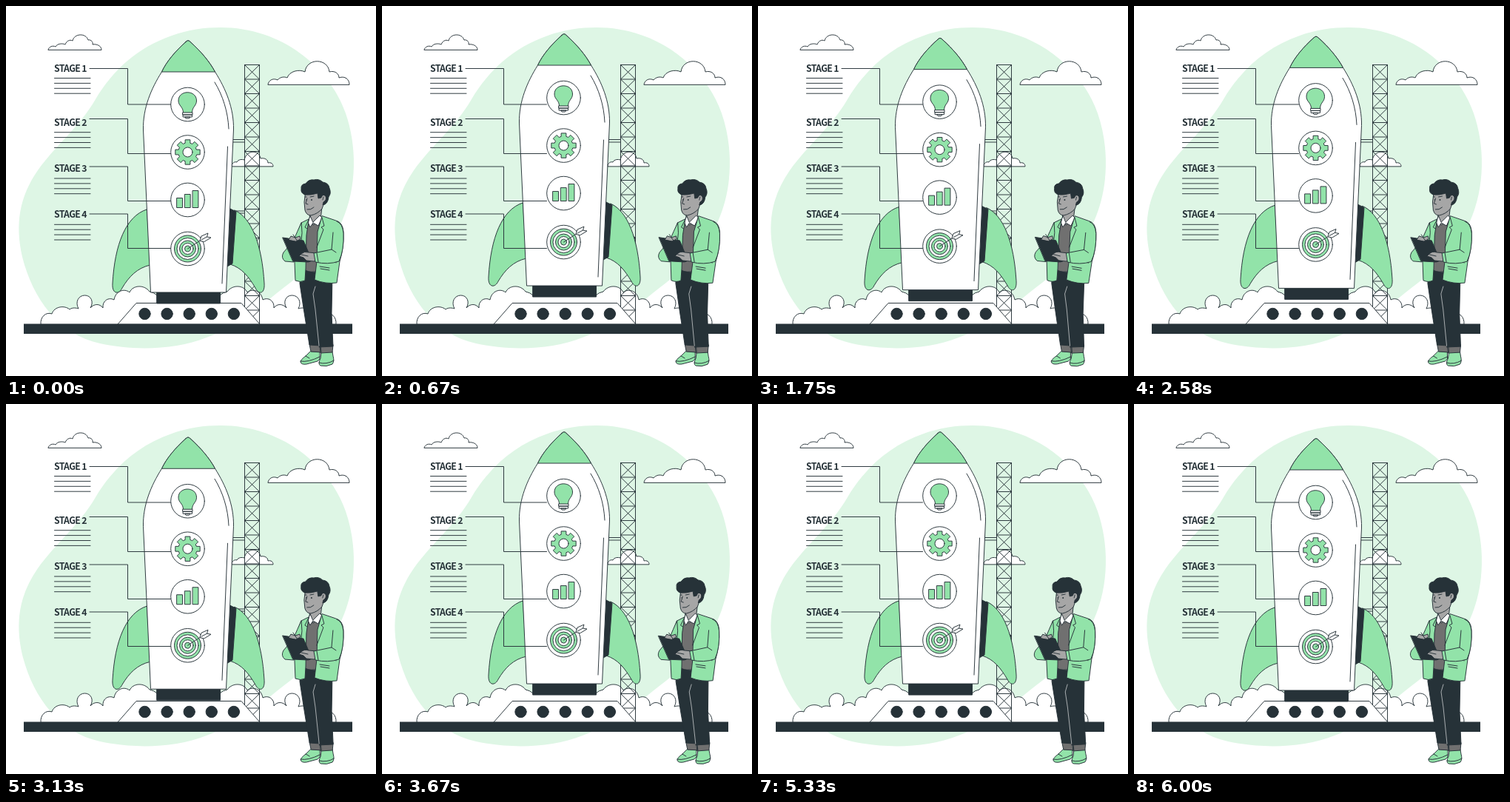
Write an HTML page that moves like this. It is 500 px wide and 500 px high and loops after 6040 ms.

```html
<!DOCTYPE html>
<html lang="en">
<head>
<meta charset="utf-8">
<title>Rocket stages</title>
<style>
  html, body { margin: 0; width: 100%; height: 100%; overflow: hidden; background: #fff; }
  svg { display: block; width: 100vw; height: 100vh; }
  .line { fill: none; }
  .white { fill: #fff; }
  .green { fill: #92e3a9; }
  .dark { fill: #263238; }
  .skin { fill: #a6a6a6; }
  .knit { fill: #707070; }
  .flat { stroke: none; }
  text { font: 700 12.3px "Noto Sans CJK JP", "Noto Sans CJK SC", "Open Sans", sans-serif; letter-spacing: -.7px; fill: #263238; stroke: none; }
</style>
</head>
<body>
<svg viewBox="0 0 500 500" stroke="#263238" stroke-width=".95" stroke-linejoin="round" stroke-linecap="round">
  <path class="flat" fill="#def6e5" d="M290 29C372 29 437 82 459 145C474 188 475 244 454 291C436 335 402 360 371 384C335 413 310 434 271 448C228 465 173 466 127 456C71 444 36 395 22 339C12 295 18 258 43 222C68 187 99 164 121 126C145 86 178 56 224 40C246 32 268 29 290 29Z"/>

  <g class="white">
    <path d="M57 59C58 55 63 53 67 55C69 51 76 50 80 52C82 47 86 45 90 47C92 37 108 36 111 46C115 45 118 49 117 52C123 51 129 54 129 59Z"/>
    <path d="M354 106C355 100 361 97 367 100C370 96 376 95 380 97C383 88 396 85 404 89C406 70 435 70 437 89C444 87 450 91 450 97C458 94 464 99 464 106Z"/>
    <path d="M305 216.500C305 212 309 210 312 211C314 207 319 207 322 208C325 194 342 194 344 206C349 205 354 207 354 212C358 211 361 213 361 216.500Z"/>
  </g>

  <g id="smoke"></g>
  <path id="tower" class="line"/>
  <path class="line" d="M305 180.500H322M305 184H322M308 277H322M308 280H322"/>

  <path class="white" d="M151 430L176 401.500H318L343 430Z"/>
  <g id="ports" class="dark"></g>

  <g id="rocket">
    <rect class="dark" x="204" y="386" width="85.500" height="16"/>
    <path class="green" d="M190 275C162 284 147 322 144 375C143 390 153 390 157 381C166 366 177 354 195 350Z"/>
    <path class="green" d="M309 276C332 286 346 323 349 375C350 390 341 390 337 381C328 366 319 354 303 349Z"/>
    <path class="dark" d="M303 274L311 278L306 348L299 352Z"/>
    <path class="white" d="M243 48.500Q246 45 249 48.500C263 61 275 75 282.500 89C297 112 308 138 307.500 167L297.500 387H195.500L185.500 167C185 138 196 112 210.500 89C217 75 229 61 243 48.500Z"/>
    <path class="green" d="M243 48.500Q246 45 249 48.500C263 61 275 75 282.500 89H210.500C217 75 229 61 243 48.500Z"/>
    <path class="line" d="M282 103C293 121 300 143 301 166M299.500 190L292 375"/>
    <g id="discs" class="white"></g>

    <path class="green" d="M239.500 144C239.500 136 233 135 233 128C233 113 257.500 113 257.500 128C257.500 135 251.500 136 251.500 144Z"/>
    <path class="white" d="M239 144H252V147H239ZM239.500 147H251.500V150H239.500ZM242 150H249L247.500 152H243.500Z"/>

    <path id="gear" class="green"/>
    <circle class="white" cx="245.500" cy="197.500" r="6.500"/>

    <g class="green">
      <rect x="231" y="259.500" width="7.500" height="13"/>
      <rect x="241.700" y="254.500" width="7.500" height="18"/>
      <rect x="252.400" y="249.500" width="7.500" height="23"/>
    </g>

    <g id="rings"></g>
    <path class="line" d="M245.500 328L264 316"/>
    <path class="white" d="M262 317L264 311L273 307L271.500 312L277 313L268 318.500Z"/>
    <path class="line" d="M264 316L271.500 312"/>
  </g>

  <g id="stages"></g>
  <rect class="dark flat" x="24" y="429.500" width="444" height="13.500"/>

  <g id="man">
    <!-- shoes and legs -->
    <path class="green" d="M411 467L405 473Q398 478 398 481Q399 485 406 484L421 480L424 477V468Z"/>
    <path class="line" d="M398 480Q408 482 424 474M405 473L410 476"/>
    <path class="green" d="M426 468L425 476Q421 484 425 486Q433 488 441 484Q444 480 442 473L441 467Z"/>
    <path class="line" d="M423 482Q433 485 443 479"/>
    <path class="knit" d="M410 457L412 467L426 468L425 457ZM424 459L425 469L441 468L442 458Z"/>
    <path class="dark" d="M398 356L397 375L402 408L410 458L424 459L423 461L442 460L440 415L441 364Z"/>
    <path class="line" stroke="#fff" stroke-width=".6" d="M418 379L415 389L418 410L423 459"/>

    <!-- torso -->
    <path class="knit" d="M411 288L406 302L404 357Q412 361 422 358L425 293Z"/>
    <path class="skin" d="M411 276L410 289L415 296L425 289L427 272Z"/>
    <path class="white" d="M411 284L408 292L411 299L415 293L422 297L427 286L424 283L415 292Z"/>
    <path class="green" d="M409 288L399 293L394 307L389 321L391 371Q398 374 404 371L405 355L406 310Z"/>
    <path class="green" d="M427 284L421 305L420 345L417 370Q432 376 447 374L451 345Q457 325 456 305Q455 292 446 290Z"/>
    <path class="line" d="M427 286L430 297L426 299L429 302L420 326M409 289L404 299L407 301M447 304L444 329L446 347M424 352L437 354M425 355L437 357"/>

    <!-- far arm and clipboard -->
    <path class="green" d="M399 293Q394 304 388 318L375 333Q371 340 377 345L389 346L398 327L400 307Z"/>
    <path class="dark" d="M374 313L402 317L413 343Q412 346 408 346L388 345Z"/>
    <path class="skin" d="M382 316L385 311L391 313L397 311L398 315L392 318Z"/>
    <path class="line" d="M388 309L394 318"/>

    <!-- near arm -->
    <path class="skin" d="M420 334L409 333Q403 331 399 335L396 338L402 340L406 344L416 345L422 343Z"/>
    <path class="line" d="M399 336L408 338"/>
    <path class="green" d="M447 291Q455 294 456 307Q457 330 450 345Q435 350 418 346L416 334L440 329L442 306"/>
    <path class="line" d="M420 334L422 346M440 329L446 333"/>

    <!-- head -->
    <path class="skin" d="M405 249L403 265L404 276Q406 283 412 283Q421 281 427 274L430 266Q435 261 432 256Q428 253 425 258L422 247Z"/>
    <path class="dark" d="M404 255Q398 253 399 247Q398 241 405 240Q409 234 416 235Q423 233 428 238Q436 239 437 246Q440 253 436 258Q435 268 428 269L429 265Q434 262 432 257Q428 253 426 259L422 260L421 253Q412 256 404 255Z"/>
    <path class="line" d="M407 260L405 267L408 268M407 275Q412 276 416 272M411 258L416 257M404 258L406 258M429 258L428 262"/>
    <circle class="dark flat" cx="413" cy="262" r="1"/>
    <circle class="dark flat" cx="406" cy="262" r=".8"/>
  </g>
</svg>
<script>
  const el = id => document.getElementById(id);
  const range = n => [...Array(n).keys()];

  // Billows on both sides of the pad share one half.
  const puff = 'M47 430C46 420 54 413 62 416C65 406 79 404 86 410C90 407 95 408 98 409C93 400 98 391 106.500 391C115 391 119 400 114 408C119 402 127 402 131 408C130 398 139 393 146 397C148 385 160 381 167 387C171 377 187 376 194 386Q200 387 204 391H247V430Z';
  el('smoke').innerHTML = ['', 'translate(493 0) scale(-1 1)']
    .map(flip => `<path class="white" d="${puff}" transform="${flip}"/>`).join('') +
    '<rect class="white flat" x="230" y="392" width="34" height="37"/>';

  const cell = 351 / 18;
  el('tower').setAttribute('d', 'M322.500 79.500V430M342.500 79.500V430' + range(18).map(i => {
    const top = 79.5 + i * cell, low = top + cell;
    return `M322.500 ${top}H342.500L322.500 ${low}M322.500 ${top}L342.500 ${low}`;
  }).join(''));

  el('ports').innerHTML = range(5).map(i =>
    `<circle cx="${187.5 + i * 30.1}" cy="416" r="7.700"/>`).join('');

  el('discs').innerHTML = [133, 197.5, 262, 328].map(y =>
    `<circle cx="245.500" cy="${y}" r="22.800"/>`).join('');

  el('rings').innerHTML = [18, 14.5, 11, 7.5, 4].map((r, i) =>
    `<circle class="${i % 2 ? 'white' : 'green'}" cx="245.500" cy="328" r="${r}"/>`).join('');

  // Eight teeth, four corners each.
  const tooth = [[12.7, -.27], [17, -.2], [17, .2], [12.7, .27]];
  el('gear').setAttribute('d', 'M' + range(8).flatMap(i => tooth.map(([r, turn]) => {
    const a = i * Math.PI / 4 + turn;
    return `${245.5 + r * Math.cos(a)} ${197.5 + r * Math.sin(a)}`;
  })).join('L') + 'Z');

  const stages = [[84.5, 133, 88.5], [152.5, 199.5, 161.7], [217, 263.5, 224], [281, 327.5, 286.3]];
  el('stages').innerHTML = stages.map(([from, to, base], i) => {
    const rules = range(4).map(k => `M65.500 ${base + 9 + k * 6.9}H114`).join('');
    return `<text x="65" y="${base}">STAGE ${i + 1}</text>
      <path class="line" d="M113 ${from}H164.500V${to}H222.500${rules}"/>`;
  }).join('');

  const LOOP = 6040;
  // Triangle wave from 0 to 1 and back.
  const triangle = phase => 1 - Math.abs(1 - 2 * (phase % 1));

  function draw(t) {
    const lift = -10 * triangle(t / 1500);
    const sway = 2 * triangle(t / 6000 + .25) - 1;
    el('rocket').setAttribute('transform', `translate(0 ${lift})`);
    el('man').setAttribute('transform', `rotate(${sway} 415 360.500)`);
  }

  const start = performance.now();
  function tick() {
    draw((performance.now() - start) % LOOP);
    requestAnimationFrame(tick);
  }
  draw(0);
  requestAnimationFrame(tick);
</script>
</body>
</html>
```
